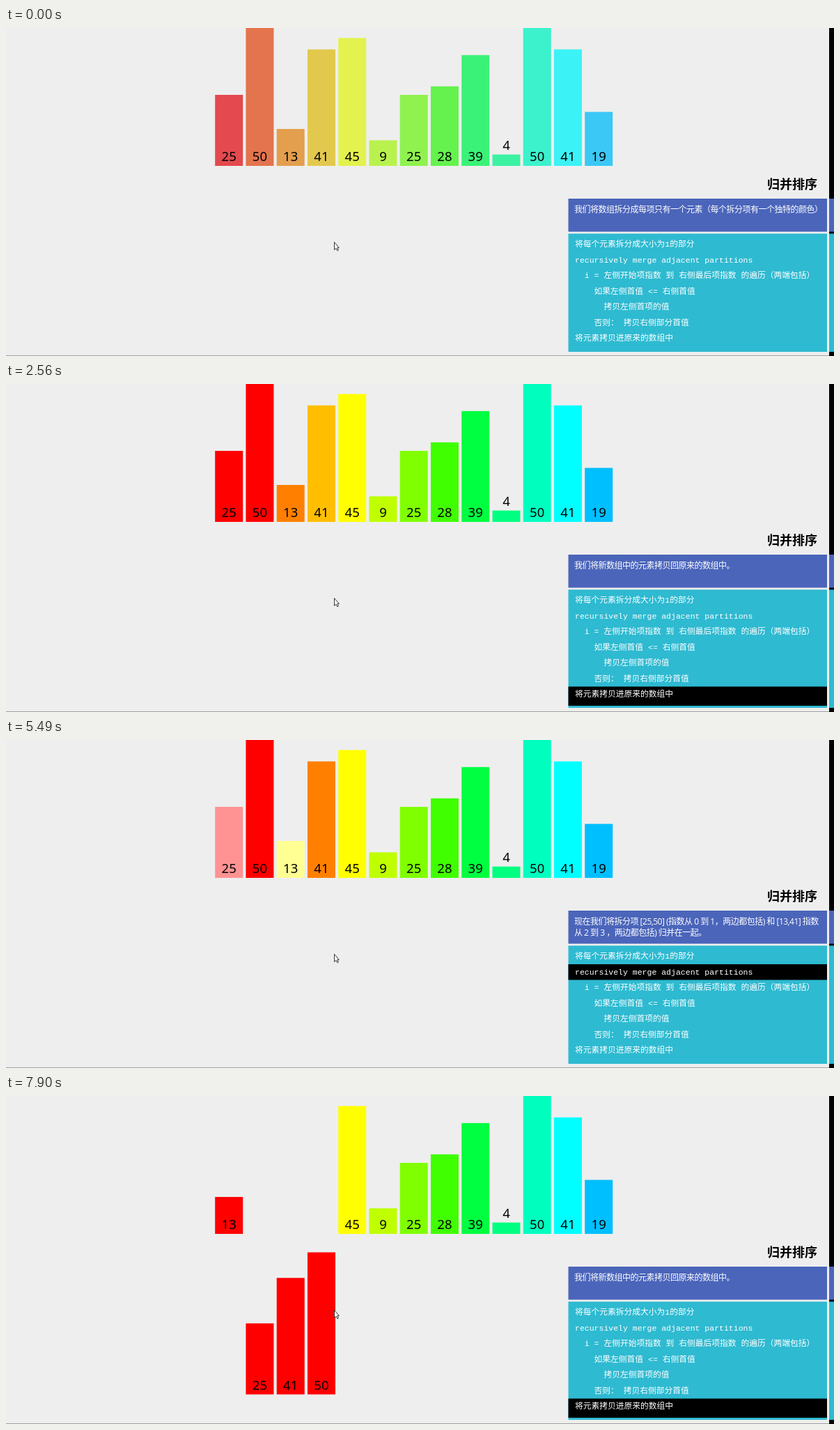
Recreate the animation shown at these times as an HTML page. Size 1189 by 471 pixels, loop 8 s.

```html
<!DOCTYPE html>
<html lang="zh-CN">
<head>
<meta charset="utf-8">
<title>归并排序</title>
<style>
  html, body { margin: 0; width: 100%; height: 100%; overflow: hidden; background: #eee; }
  svg { position: absolute; left: 0; top: 0; }
  .number { font: 18.5px "Noto Sans", "Open Sans", sans-serif; text-anchor: middle; }
  .title { font: bold 18px "Noto Sans CJK SC", "Noto Sans CJK", sans-serif; }
  .code { font: 11.5px "Liberation Mono", "Noto Sans CJK SC", monospace; fill: #fff; white-space: pre; }
  .han { font: 11.75px "Noto Sans CJK SC", "Noto Sans CJK", sans-serif; }
  #status {
    position: absolute; left: 816px; top: 253px; width: 353px; color: #fff;
    font: 12px/16px "Open Sans", "Noto Sans CJK SC", "Noto Sans CJK", sans-serif;
    letter-spacing: -.5px;
  }
</style>
</head>
<body>
<svg width="1189" height="471" viewBox="0 0 1189 471">
  <rect width="1189" height="471" fill="#eee"/>
  <rect y="470" width="1182" height="1" fill="#a0a0a0"/>
  <rect x="1182" width="7" height="471"/>
  <g fill="#4b65ba">
    <rect x="807.5" y="245" width="371.5" height="47.5"/>
    <rect x="1182" y="245" width="7" height="47.5"/>
  </g>
  <g fill="#2ebad1">
    <rect x="807.5" y="295.3" width="371.5" height="169.7"/>
    <rect x="1182" y="295.3" width="7" height="169.7"/>
  </g>
  <text class="title" x="1093" y="231">归并排序</text>
  <g id="rows"></g>
  <g id="bars"></g>
  <path d="M471.5 307.5V318.5L474 316.3L475.8 319.8L477.4 319L475.7 315.6H478.3Z"
        fill="#fff" stroke="#222" stroke-width=".9"/>
</svg>
<div id="status"></div>
<script>
const SVG = 'http://www.w3.org/2000/svg';
const LOOP = 8000, FIRST_STEP = 367, STEP = 484.8, MOVE = 250;
const TOP = 198, BOTTOM = 428.5, UNIT = 4.08;
const RED = [255, 0, 0], ORANGE = [255, 128, 0], PALE_BLUE = [173, 216, 230];
const PINK = [255, 147, 147], PEACH = [255, 214, 153], CREAM = [255, 255, 147];

// Moments at which the screen refreshes
const ticks = [0, 120, 390, 520, 630, 880, 1010, 1150, 1430, 1580, 1860, 2010, 2130,
  2440, 2560, 2860, 2980, 3280, 3420, 3550, 3830, 3960, 4070, 4350, 4470, 4590,
  4850, 4980, 5100, 5340, 5490, 5770, 5900, 6030, 6210, 6340, 6490, 6770, 6920,
  7200, 7330, 7470, 7750, 7900];

const values = [25, 50, 13, 41, 45, 9, 25, 28, 39, 4, 50, 41, 19];
const codeLines = [
  '将每个元素拆分成大小为1的部分',
  'recursively merge adjacent partitions',
  '  i = 左侧开始项指数 到 右侧最后项指数 的遍历（两端包括）',
  '    如果左侧首值 <= 右侧首值',
  '      拷贝左侧首项的值',
  '    否则： 拷贝右侧部分首值',
  '将元素拷贝进原来的数组中'
];

const intro = '我们将数组拆分成每项只有一个元素（每个拆分项有一个独特的颜色）';
const copyBack = '我们将新数组中的元素拷贝回原来的数组中。';
const merging = (left, a, b, right, c, d) =>
  `现在我们将拆分项 [${left}] (指数从 ${a} 到 ${b}，两边都包括) 和 [${right}] 指数从 ${c} 到 ${d} ，两边都包括) 归并在一起。`;
const comparing = (left, sign, right) =>
  `因为 ${left} (左拆分) ${sign} ${right} (右拆分), 我们将 {rightPart} 拷进新的数组。`;
const emptied = (empty, value, other) =>
  `因为${empty}拆分是空的，我们将 ${value} (${other}拆分) 拷进新的数组。`;

const tint = (bar, color) => ({ bar, color });
const down = (bar, slot, color) => ({ bar, slot, y: BOTTOM, color });
const up = bar => ({ bar, y: TOP });
const takeLeft = [2, 3, 4], takeRight = [2, 5];

const steps = [
  [merging(25, 0, 0, 50, 1, 1), [1], tint(0, PINK), tint(1, PEACH)],
  [comparing(25, '<=', 50), takeLeft, down(0, 0, RED)],
  [emptied('左', 50, '右'), takeRight, down(1, 1, RED)],
  [copyBack, [6], up(0)],
  [copyBack, [6], up(1)],
  [merging(13, 2, 2, 41, 3, 3), [1], tint(2, CREAM), tint(3, CREAM)],
  [comparing(13, '<=', 41), takeLeft, down(2, 2, ORANGE)],
  [emptied('左', 41, '右'), takeRight, down(3, 3, ORANGE)],
  [copyBack, [6], up(2)],
  [copyBack, [6], up(3)],
  [merging('25,50', 0, 1, '13,41', 2, 3), [1], tint(0, PINK), tint(2, CREAM)],
  [comparing(25, '>', 13), takeRight, down(2, 0, RED), tint(3, CREAM)],
  [comparing(25, '<=', 41), takeLeft, down(0, 1, RED), tint(1, PINK)],
  [comparing(50, '>', 41), takeRight, down(3, 2, RED)],
  [emptied('右', 50, '左'), takeLeft, down(1, 3, RED)],
  [copyBack, [6], up(2)]
];

const mix = (a, b, p) => a + (b - a) * p;
const mixColor = (a, b, p) => a.map((v, i) => mix(v, b[i], p));
const ease = p => p >= 1 ? 1 : p < .5 ? 4 * p ** 3 : 1 - 4 * (1 - p) ** 3;

function hueColor(i) {
  const hue = i * 15 + (i > 7 ? 15 : 0);
  return [0, 120, 240].map(center => {
    const d = Math.abs(hue - center);
    return 255 * Math.max(0, Math.min(1, 2 - Math.min(d, 360 - d) / 60));
  });
}

function add(parent, tag, attrs) {
  const node = parent.appendChild(document.createElementNS(SVG, tag));
  set(node, attrs);
  return node;
}
function set(node, attrs) {
  for (const name in attrs) node.setAttribute(name, attrs[name]);
}

const rowGroup = document.getElementById('rows');
const barGroup = document.getElementById('bars');
const status = document.getElementById('status');
const statusText = status.appendChild(document.createTextNode(''));

const rows = codeLines.map((line, i) => {
  const back = add(rowGroup, 'rect',
    { x: 807.5, y: 299.5 + 22.5 * i, width: 371.5, height: i === 6 ? 27.5 : 22.5 });
  const label = add(rowGroup, 'text', { class: 'code', x: 817, y: 314.2 + 22.5 * i });
  label.innerHTML = line.replace(/</g, '&lt;')
    .replace(/[\u3000-\uffef]+/g, '<tspan class="han">$&</tspan>');
  return back;
});

const bars = values.map((value, i) => {
  const height = value * UNIT;
  const box = add(barGroup, 'rect', { width: 40, height });
  const label = add(barGroup, 'text', { class: 'number' });
  label.textContent = value;
  return { box, label, height, color: hueColor(i) };
});

function draw(time) {
  const now = ticks.filter(tick => tick <= time).pop();
  const fade = now < 120 ? .34 : 0;
  const state = bars.map((bar, i) =>
    ({ slot: i, y: TOP, color: mixColor(bar.color, PALE_BLUE, fade) }));
  let message = intro, active = [];

  steps.forEach(([text, lines, ...changes], k) => {
    const elapsed = now - FIRST_STEP - STEP * k;
    if (elapsed < 0) return;
    message = text;
    active = lines;
    const p = ease(elapsed / MOVE);
    for (const { bar, slot, y, color } of changes) {
      const s = state[bar];
      if (slot !== undefined) s.slot = mix(s.slot, slot, p);
      if (y !== undefined) s.y = mix(s.y, y, p);
      if (color) s.color = mixColor(s.color, color, p);
    }
  });

  bars.forEach(({ box, label, height }, i) => {
    const { slot, y, color } = state[i];
    const x = 300.2 + 44.25 * slot;
    set(box, { x, y: y - height, fill: `rgb(${color.map(Math.round)})` });
    set(label, { x: x + 20, y: height < 20 ? y - height - 6.7 : y - 7 });
  });
  rows.forEach((row, i) => set(row, { visibility: active.includes(i) ? 'visible' : 'hidden' }));
  if (statusText.data !== message) statusText.data = message;
}

const start = performance.now();
function loop() {
  draw((performance.now() - start) % LOOP);
  requestAnimationFrame(loop);
}
loop();
</script>
</body>
</html>
```
